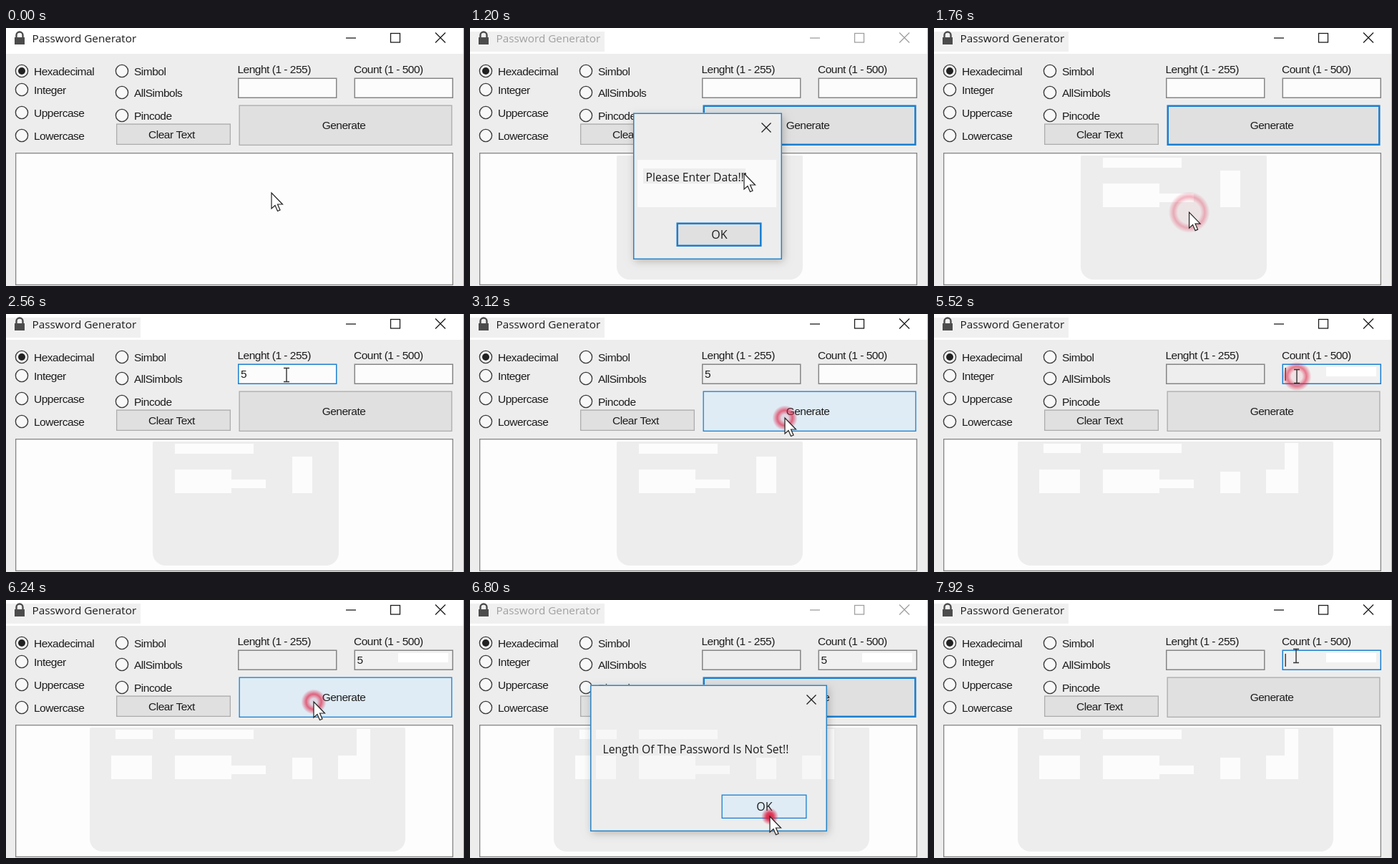
Animation, 640 px wide and 360 px high, one loop 8 s. Source, as an HTML page with a canvas:

```html
<!DOCTYPE html>
<html lang="en">
<head>
<meta charset="utf-8">
<title>Password Generator</title>
<style>
html, body { margin: 0; width: 100%; height: 100%; overflow: hidden; background: #ededed; }
canvas { display: block; }
</style>
</head>
<body>
<canvas id="stage" width="640" height="360"></canvas>
<script>
const ctx = document.getElementById('stage').getContext('2d');
const LOOP = 8000, STEP = 80;
const BLUE = '#1a7fd0', FACE = '#ededed', INK = '#1c1c1c', PALE = '#fcfcfc';
const UI = '"Liberation Sans", Arial, sans-serif';
const HUMAN = '"Open Sans", "Noto Sans", sans-serif';

// time, x, y of the pointer tip
const path = [
  [0, 371, 230], [160, 371, 230], [480, 396, 148], [800, 396, 148],
  [1200, 383, 203], [1440, 350, 289], [1680, 350, 289], [2000, 392, 85],
  [2640, 392, 85], [2960, 440, 145], [3200, 440, 145], [3520, 444, 290],
  [4240, 444, 290], [4560, 372, 85], [5040, 372, 85], [5360, 507, 87],
  [5760, 507, 87], [6080, 430, 142], [6320, 430, 142], [6720, 419, 302],
  [7120, 419, 302], [7440, 506, 78], [8000, 506, 78]
];
const clicks = [560, 1520, 2000, 3040, 3600, 4640, 5400, 6160, 6800, 7440];
const dialogs = [
  { from: 640, to: 1680, x: 228, w: 208, text: 'Please Enter Data!!!' },
  { from: 3200, to: 3760, x: 140, w: 389, text: 'Count Of Generated Passwords Is Not Set!!' },
  { from: 6320, to: 6960, x: 168, w: 331, text: 'Length Of The Password Is Not Set!!' }
];
const radios = [
  ['Hexadecimal', 22, 60], ['Integer', 22, 86], ['Uppercase', 22, 118], ['Lowercase', 22, 150],
  ['Simbol', 162, 60], ['AllSimbols', 162, 90], ['Pincode', 162, 122]
];
// light patches inside the grey stain: x, y, w, h
const narrowPatches = [[236, 181, 110, 14], [236, 217, 79, 33], [315, 231, 48, 12], [400, 199, 28, 51]];
const widePatches = [
  [153, 181, 52, 13], [147, 217, 57, 33], [236, 181, 110, 13], [236, 217, 79, 33],
  [315, 231, 48, 12], [400, 220, 28, 30], [464, 217, 26, 33], [490, 180, 19, 70]
];

const within = (t, ...spans) => spans.some(([a, b]) => t >= a && t < b);

function pointerAt(t) {
  let i = 1;
  while (i < path.length - 1 && path[i][0] <= t) i++;
  const [t0, x0, y0] = path[i - 1], [t1, x1, y1] = path[i];
  const p = (t - t0) / (t1 - t0), e = p * p * (3 - 2 * p);
  return { x: x0 + (x1 - x0) * e, y: y0 + (y1 - y0) * e };
}

function fill(x, y, w, h, color) {
  ctx.fillStyle = color;
  ctx.fillRect(x, y, w, h);
}

function box(x, y, w, h, face, edge, line = 1) {
  fill(x, y, w, h, face);
  ctx.strokeStyle = edge;
  ctx.lineWidth = line;
  ctx.strokeRect(x + line / 2, y + line / 2, w - line, h - line);
}

function lines(color, width, ...segments) {
  ctx.strokeStyle = color;
  ctx.lineWidth = width;
  ctx.beginPath();
  for (const [x0, y0, x1, y1] of segments) {
    ctx.moveTo(x0, y0);
    ctx.lineTo(x1, y1);
  }
  ctx.stroke();
}

function cross(x, y, r, color) {
  lines(color, 1.3, [x - r, y - r, x + r, y + r], [x + r, y - r, x - r, y + r]);
}

function label(s, x, y, { font = UI, size = 15.5, color = INK, align = 'left' } = {}) {
  ctx.font = `${size}px ${font}`;
  ctx.letterSpacing = font === UI ? '-0.5px' : '0px';
  ctx.textAlign = align;
  ctx.fillStyle = color;
  ctx.fillText(s, x, y);
}

function button(s, x, y, w, h, focused, hover, textShift, style) {
  const edge = hover || focused ? BLUE : '#adadad';
  box(x, y, w, h, hover ? '#dfecf5' : '#e0e0e0', edge, focused && !hover ? 2.5 : 1.3);
  label(s, x + w / 2 + textShift, y + h / 2 + 5.5, { align: 'center', ...style });
}

function titleBar(active, tinted) {
  const color = active ? INK : '#a0a0a0';
  fill(0, 0, 640, 36, '#fff');
  if (tinted) fill(0, 5, 188, 28, '#f0f0f0');
  ctx.strokeStyle = '#4c4c4c';
  ctx.lineWidth = 2.4;
  ctx.beginPath();
  ctx.moveTo(14.5, 14);
  ctx.lineTo(14.5, 10);
  ctx.arc(19, 10, 4.5, Math.PI, 0);
  ctx.lineTo(23.5, 14);
  ctx.stroke();
  fill(12, 13, 14, 10, '#4c4c4c');
  label('Password Generator', 36.5, 20, { font: HUMAN, size: 15.3, color });
  lines(color, 1.3, [475, 14, 489, 14]);
  ctx.strokeRect(537.5, 7.5, 13, 12.5);
  cross(607, 13.5, 7, color);
}

function radio([name, x, y], i) {
  ctx.beginPath();
  ctx.arc(x, y, 8.6, 0, 7);
  ctx.fillStyle = '#f8f8f8';
  ctx.fill();
  ctx.strokeStyle = '#3c3c3c';
  ctx.lineWidth = 1.4;
  ctx.stroke();
  if (i === 0) {
    ctx.beginPath();
    ctx.arc(x, y, 5, 0, 7);
    ctx.fillStyle = '#222';
    ctx.fill();
  }
  label(name, x + 17, y + 6);
}

function field(x, value, face, focusAge) {
  const focused = focusAge >= 0;
  box(x, 69.5, 138.5, 28.5, face, focused ? BLUE : '#858585', 1.5);
  label(value, x + 4, 89);
  if (focused && focusAge % 1060 < 530) fill(x + (value ? 14 : 4), 75, 1.3, 18, '#222');
}

// grey area the message boxes leave on the output panel
function stain(x0, x1, patches) {
  ctx.fillStyle = FACE;
  ctx.beginPath();
  ctx.roundRect(x0, 178, x1 - x0, 173, [2, 2, 18, 18]);
  ctx.fill();
  patches.forEach(p => fill(...p, PALE));
}

function panel(t) {
  box(13, 174, 612, 185, '#fdfdfd', '#858585', 1.3);
  if (t >= 3200) stain(117, 558, widePatches);
  else if (t >= 640) stain(205, 465, narrowPatches);
}

function dialog({ x, w, text }, at) {
  ctx.save();
  ctx.shadowColor = 'rgba(0,0,0,.24)';
  ctx.shadowBlur = 11;
  ctx.shadowOffsetX = 2;
  ctx.shadowOffsetY = 3;
  fill(x, 118.5, w, 204.5, FACE);
  ctx.restore();
  box(x, 118.5, w, 204.5, FACE, '#2b84c4', 1.5);
  if (w < 300) {
    fill(234, 184, 194, 66, '#fafafa');
    fill(242, 196, 143, 21, FACE);
  } else {
    ctx.save();
    ctx.beginPath();
    ctx.rect(x + 8, 120, w - 16, 200);
    ctx.clip();
    widePatches.forEach(p => fill(...p, '#f7f7f7'));
    ctx.restore();
  }
  cross(x + w - 22, 139, 6.5, INK);
  label(text, x + 17.5, 214, { font: HUMAN, size: 15.7 });
  const bx = x + w - 147.5;
  const hover = at.x > bx && at.x < bx + 119 && at.y > 271 && at.y < 305;
  button('OK', bx, 271.5, 119, 33.5, true, hover, 0.5, { font: HUMAN, size: 16 });
}

// soft ring that grows out of each click
function halo(t, at) {
  const age = t - clicks.filter(c => c <= t).pop();
  if (!(age < 440)) return;
  const ring = 5 + 28 * age / 400, outer = ring + 7;
  const fade = 1 - age / 440, core = Math.max(0.1 * fade, 1 - age / 90);
  const red = a => `rgba(222,30,66,${a})`;
  const g = ctx.createRadialGradient(at.x, at.y, 0, at.x, at.y, outer);
  g.addColorStop(0, red(core));
  g.addColorStop(Math.max(0, ring - 6) / outer, red(core));
  g.addColorStop(ring / outer, red(0.85 * fade ** 1.2));
  g.addColorStop(1, red(0));
  ctx.fillStyle = g;
  ctx.beginPath();
  ctx.arc(at.x, at.y, outer, 0, 7);
  ctx.fill();
}

function arrow({ x, y }) {
  ctx.save();
  ctx.translate(x, y);
  ctx.beginPath();
  [[0, 0], [0, 22], [5, 17.5], [8.5, 25.5], [12, 24], [8.5, 16], [15.5, 16]]
    .forEach(([px, py]) => ctx.lineTo(px, py));
  ctx.closePath();
  ctx.fillStyle = '#fff';
  ctx.fill();
  ctx.strokeStyle = '#222';
  ctx.lineWidth = 1.2;
  ctx.stroke();
  ctx.restore();
}

function beam({ x, y }) {
  lines('#333', 1.4, [x, y - 9, x, y + 9],
    [x - 4, y - 9.5, x + 4, y - 9.5], [x - 4, y + 9.5, x + 4, y + 9.5]);
}

function draw(t) {
  const at = pointerAt(t);
  const open = dialogs.find(d => within(t, [d.from, d.to]));
  const overField = !open && at.y > 70 && at.y < 98 &&
    (at.x > 324 && at.x < 463 || at.x > 487 && at.x < 626);
  const overGenerate = !open && at.x > 326 && at.x < 624 && at.y > 108 && at.y < 164;

  fill(0, 0, 640, 360, FACE);
  titleBar(!open, t >= 640);
  radios.forEach(radio);
  label('Lenght (1 - 255)', 323.5, 63);
  label('Count (1 - 500)', 486, 63);

  const lengthAge = within(t, [2000, 3040]) ? t - 2000 : within(t, [4640, 5400]) ? t - 4640 : -1;
  const countAge = within(t, [5400, 6160]) ? t - 5400 : t >= 7440 ? t - 7440 : -1;
  field(324, within(t, [2400, 4880]) ? '5' : '', t < 2720 ? PALE : '#eeeeee', lengthAge);
  const soft = t >= 5400;
  field(486.5, within(t, [5760, 7680]) ? '5' : '', soft ? '#f1f1f1' : PALE, countAge);
  if (soft) fill(548, 74, 70, 13, '#fff');

  button('Clear Text', 154, 133.5, 160, 29.5, false, false, -2.5);
  const focused = within(t, [560, 2000], [3040, 4640], [6160, 7440]);
  button('Generate', 325.5, 107.5, 298, 56.5, focused, overGenerate, -2.5);
  panel(t);
  fill(639, 0, 1, 360, open ? '#b4b4b4' : '#8fb8d0');
  if (open) dialog(open, at);
  halo(t, at);
  (overField ? beam : arrow)(at);
}

const begin = performance.now();
function tick() {
  const t = (performance.now() - begin) % LOOP;
  draw(Math.floor(t / STEP) * STEP);
  requestAnimationFrame(tick);
}
tick();
</script>
</body>
</html>
```
